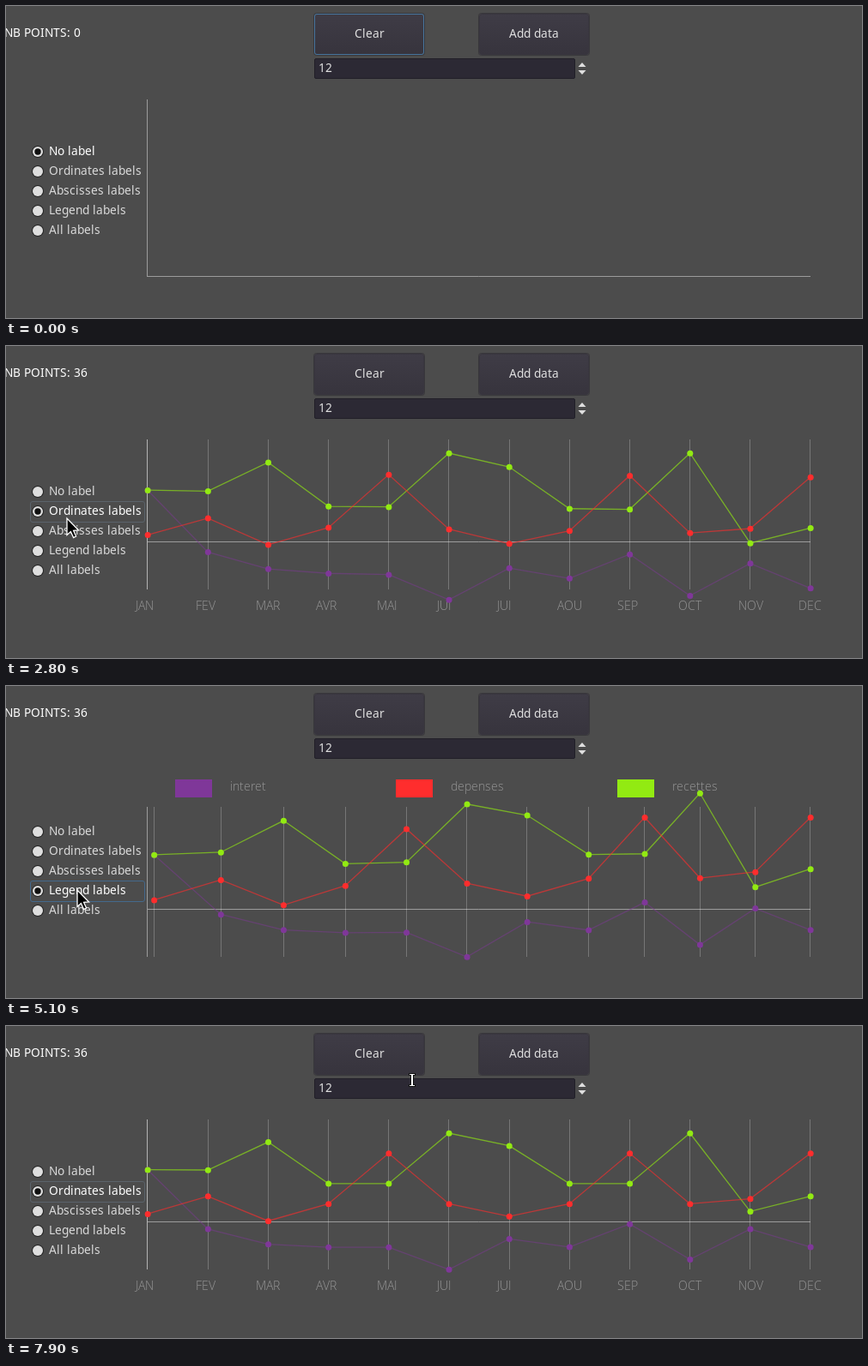
These frames come from a looping animation (997x364 px, 8000 ms). An HTML page with a canvas:

```html
<!DOCTYPE html>
<html lang="en">
<head>
<meta charset="utf-8">
<title>Chart demo</title>
<style>
  html, body { margin: 0; width: 100%; height: 100%; overflow: hidden; background: #4c4c4c; }
  canvas { display: block; width: 997px; height: 364px; }
</style>
</head>
<body>
<canvas id="stage" width="997" height="364"></canvas>
<script>
const ctx = document.getElementById('stage').getContext('2d');
const LOOP = 8000, TICK = 100;
const UI_FONT = '13.7px "Noto Sans", sans-serif';
const CHART_FONT = '300 14px "Open Sans", sans-serif';
const LABEL_COLOR = '#969696', AXIS_COLOR = '#9c9c9c';
const RIGHT = 936.95, LAST = 11, HEADROOM = 16;
const SPAWN = { x: 943, y: 322 };

const MONTHS = 'JAN FEV MAR AVR MAI JUI JUI AOU SEP OCT NOV DEC'.split(' ');
const RADIOS = ['No label', 'Ordinates labels', 'Abscisses labels', 'Legend labels', 'All labels'];

// Spring and autumn share the same quarter of spending and income.
const spent = [350, 1350, 350], earned = [750, 750, 1750];
const interest = { name: 'interet', color: '#7f3799', alpha: 0.48,
  data: [1025, -150, -450, -510, -510, -950, -345, -505, -50, -750, -150, -505] };
const expenses = { name: 'depenses', color: '#ff2d2d', alpha: 0.62,
  data: [150, 500, 10, ...spent, 100, ...spent, 450, 1350] };
const income = { name: 'recettes', color: '#92ea12', alpha: 0.64,
  data: [1025, 1020, 1575, ...earned, 1500, ...earned, 200, 500] };
const SERIES = [interest, expenses, income];
const DRAW_ORDER = [interest, income, expenses];
const LOW = Math.min(...interest.data), HIGH = Math.max(...income.data);

const layout = (months, values, legend) => ({
  months, values, legend,
  x0: values ? 228.95 : 164.95,
  top: legend ? 141 : 109,
  bottom: months ? 284 : 316
});
const MODES = [layout(), layout(true), layout(false, true), layout(false, false, true), layout(true, true, true)];

const CLICKS = [
  { at: 915, mode: 0 }, { at: 2467, mode: 1 }, { at: 3866, mode: 2 },
  { at: 4835, mode: 3 }, { at: 5799, mode: 4 }, { at: 6820, mode: 1 }
];
const MOVES = [
  { from: 300, to: 700, x: 574, y: 33 },
  { from: 1050, to: 2500, x: 71, y: 201 },
  { from: 3450, to: 3600, x: 79, y: 216 },
  { from: 4400, to: 4700, x: 83, y: 238 },
  { from: 5200, to: 5700, x: 90, y: 263 },
  { from: 6100, to: 6600, x: 86, y: 188 },
  { from: 6900, to: 7700, x: 483, y: 67 },
  { from: 7800, to: 7900, x: 473, y: 63 }
];

const ARROW = new Path2D('M0 0V19.5L4.4 15.6L7.6 22.5L10.6 21L7.6 14.4L13.6 14Z');

const lerp = (a, b, p) => a + (b - a) * p;
const clamp = v => Math.min(1, Math.max(0, v));
const smooth = p => p * p * (3 - 2 * p);
const circOut = t => Math.sqrt(1 - (1 - t) ** 2);
const crisp = v => Math.floor(v) + 0.5;

function pointerAt(t) {
  let x = 388, y = -30;
  for (const m of MOVES) {
    const p = smooth(clamp((t - m.from) / (m.to - m.from)));
    x = lerp(x, m.x, p);
    y = lerp(y, m.y, p);
  }
  return { x: Math.round(x), y: Math.round(y) };
}

const xOf = (mode, i) => lerp(mode.x0, RIGHT, i / LAST);
const yOf = (mode, v) => lerp(mode.bottom, mode.top + HEADROOM, (v - LOW) / (HIGH - LOW));

// Points leave one after another; the newest one travels alone and slower.
function progress(i, elapsed, first) {
  if (first && i === LAST) return circOut(clamp(elapsed));
  return circOut(clamp((elapsed - Math.sqrt(i) / 10) / 0.5));
}

function line(x1, y1, x2, y2, color) {
  ctx.strokeStyle = color;
  ctx.lineWidth = 1;
  ctx.beginPath();
  ctx.moveTo(x1, y1);
  ctx.lineTo(x2, y2);
  ctx.stroke();
}

// Letters sit on whole pixels, each with a rounded advance.
function text(str, x, y, color, font = UI_FONT, centered = false) {
  ctx.font = font;
  ctx.fillStyle = color;
  const widths = [...str].map(c => Math.round(ctx.measureText(c).width));
  if (centered) x -= widths.reduce((a, b) => a + b) / 2;
  x = Math.round(x);
  [...str].forEach((c, i) => {
    ctx.fillText(c, x, Math.round(y));
    x += widths[i];
  });
}

function disc(x, y, r, color) {
  ctx.fillStyle = color;
  ctx.beginPath();
  ctx.arc(x, y, r, 0, Math.PI * 2);
  ctx.fill();
}

function box(x, y, w, h, r, stroke, fill) {
  ctx.beginPath();
  ctx.roundRect(x, y, w, h, r);
  if (fill) { ctx.fillStyle = fill; ctx.fill(); }
  ctx.strokeStyle = stroke;
  ctx.lineWidth = 1;
  ctx.stroke();
}

function button(label, x, focus, hover) {
  const fill = ctx.createLinearGradient(0, 9, 0, 57);
  fill.addColorStop(0, hover ? '#484551' : '#3f3c46');
  fill.addColorStop(1, hover ? '#403d48' : '#37343d');
  box(x - 0.5, 8.5, 129, 49, 3, '#38373b');
  box(x + 0.5, 9.5, 127, 47, 2.5, focus ? '#47759d' : '#39363f', fill);
  text(label, x + 64, 37, '#e0e0e0', UI_FONT, true);
}

function triangle(x, y, dir) {
  ctx.fillStyle = '#dedede';
  ctx.beginPath();
  ctx.moveTo(x - 4.5, y);
  ctx.lineTo(x + 4.5, y);
  ctx.lineTo(x, y + 5 * dir);
  ctx.fill();
}

function drawControls(t, mode, mouse) {
  const [added, chosen] = CLICKS;
  const over = (x, y, w, h) => mouse.x >= x && mouse.x < x + w && mouse.y >= y && mouse.y < y + h;

  text('NB POINTS: ' + (t >= added.at ? 36 : 0), -2, 36, '#ffffff');
  button('Clear', 359, t < 900, over(359, 9, 128, 48));
  button('Add data', 551, t >= 900 && t < chosen.at, over(530, 9, 150, 48));

  box(359.5, 61.5, 303, 23, 1.5, '#211f28', '#2c2934');
  text('12', 364, 77, '#e0e0e0');
  triangle(671, 71, -1);
  triangle(671, 75, 1);

  RADIOS.forEach((label, i) => {
    const y = 170 + 23 * i, on = i === mode;
    disc(37, y, 7, '#242424');
    disc(37, y, 6, '#dedede');
    if (on) disc(37, y, 3.7, '#101010');
    if (on && t >= chosen.at) box(28.5, y - 11.5, 133, 24, 2.5, i === 1 ? '#5b636b' : '#44698c');
    text(label, 50, y + 4, on || over(28, y - 11, 133, 23) ? '#ffffff' : '#dadada');
  });
}

function drawLegend(mode) {
  const step = (RIGHT - mode.x0) / SERIES.length;
  SERIES.forEach((s, i) => {
    const x = Math.floor(mode.x0 + 32.5 + step * i);
    ctx.fillStyle = s.color;
    ctx.fillRect(x, 109, 43, 21);
    text(s.name, x + 64, 122, LABEL_COLOR, CHART_FONT);
  });
}

function drawValues(mode) {
  for (let v = -500; v <= 1500; v += 500) {
    const label = v > 1000 ? (v / 1000).toFixed(2) + ' K' : String(v);
    text(label, mode.x0 - 16.5 - 9.5 * Math.min(5, label.length), yOf(mode, v), LABEL_COLOR, CHART_FONT);
  }
}

function drawChart(t) {
  const k = CLICKS.findLastIndex(c => t >= c.at);
  const mode = MODES[k < 0 ? 0 : CLICKS[k].mode];
  const axis = crisp(mode.x0 - 0.5);
  const zero = crisp(k < 0 ? mode.bottom - 1 : yOf(mode, 0));
  line(axis, mode.top, axis, mode.bottom, AXIS_COLOR);
  line(axis, zero, 937, zero, AXIS_COLOR);
  if (mode.values) drawValues(mode);
  if (mode.legend) drawLegend(mode);
  if (k < 0) return;

  const first = k === 0;
  const before = first ? null : MODES[CLICKS[k - 1].mode];
  const elapsed = (t - CLICKS[k].at) / 1000;
  const ps = MONTHS.map((_, i) => progress(i, elapsed, first));
  const xs = ps.map((p, i) => lerp(first ? SPAWN.x : xOf(before, i), xOf(mode, i), p));
  const heights = s => s.data.map((v, i) => lerp(first ? SPAWN.y : yOf(before, v), yOf(mode, v), ps[i]));

  xs.forEach((x, i) => {
    line(crisp(x), mode.top, crisp(x), mode.bottom, 'rgba(255,255,255,.24)');
    if (mode.months) text(MONTHS[i], x - 14, 308, LABEL_COLOR, CHART_FONT);
  });

  for (const s of DRAW_ORDER) {
    const ys = heights(s);
    ctx.globalAlpha = s.alpha;
    ctx.strokeStyle = s.color;
    ctx.lineWidth = 1.3;
    ctx.beginPath();
    xs.forEach((x, i) => ctx.lineTo(x, ys[i]));
    ctx.stroke();
    ctx.globalAlpha = 1;
  }
  for (const s of DRAW_ORDER) {
    heights(s).forEach((y, i) => {
      const extra = first ? 7 * (1 - ps[i]) ** 1.7 : 0;
      disc(xs[i] + 0.2, y + 0.2, 3.5 + extra, s.color);
    });
  }
}

function drawArrow(x, y) {
  ctx.save();
  ctx.translate(x, y);
  ctx.fillStyle = '#000';
  ctx.fill(ARROW);
  ctx.strokeStyle = '#fff';
  ctx.lineWidth = 1.3;
  ctx.stroke(ARROW);
  ctx.restore();
}

function drawBeam(x, y) {
  for (const [color, grow] of [['#111', 1], ['#fff', 0]]) {
    ctx.fillStyle = color;
    const bar = (bx, by, w, h) => ctx.fillRect(bx - grow, by - grow, w + 2 * grow, h + 2 * grow);
    bar(x - 3, y - 7, 6, 1);
    bar(x - 1, y - 7, 2, 14);
    bar(x - 3, y + 6, 6, 1);
  }
}

function draw(t) {
  ctx.fillStyle = '#4c4c4c';
  ctx.fillRect(0, 0, 997, 364);
  const mouse = pointerAt(t);
  const click = CLICKS.findLast(c => t >= c.at);
  drawControls(t, click ? click.mode : 0, mouse);
  drawChart(t);
  const inField = mouse.x > 359 && mouse.x < 662 && mouse.y > 60 && mouse.y < 85;
  (inField ? drawBeam : drawArrow)(mouse.x, mouse.y);
}

const start = performance.now();
function loop() {
  const t = (performance.now() - start) % LOOP;
  draw(Math.floor(t / TICK) * TICK);
  requestAnimationFrame(loop);
}
loop();
</script>
</body>
</html>
```
